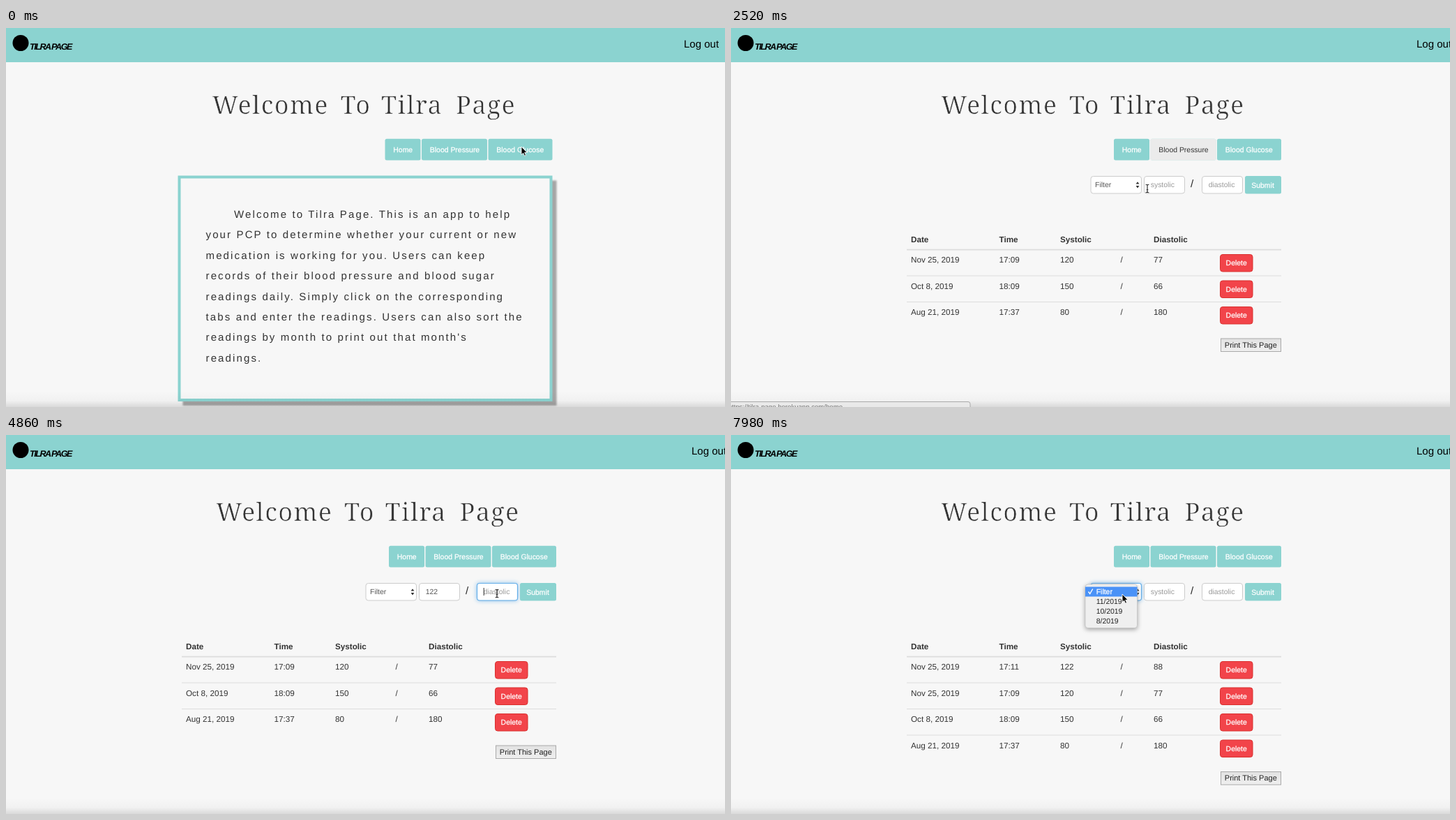
Animation, 1031 px wide and 543 px high, one loop 8000 ms. Source, as an HTML page:

```html
<!DOCTYPE html>
<html lang="en">
<head>
<meta charset="utf-8">
<title>Tilra Page</title>
<style>
  html, body { margin: 0; width: 100%; height: 100%; overflow: hidden; background: #f7f7f7; }
  svg { display: block; width: 1031px; height: 543px; }
  text { font-family: "Liberation Sans", Arial, sans-serif; text-rendering: geometricPrecision; white-space: pre; }
  text[fill="#fff"] { stroke: #fff; stroke-width: .25px; }
  /* a page-coloured outline thins the strokes */
  .title { font: 300 36px "Noto Serif", serif; letter-spacing: 1.4px; stroke: #f7f7f7; stroke-width: .75px; }
  .glow { filter: drop-shadow(0 0 3px rgba(102, 175, 233, .75)); }
  .menu { filter: drop-shadow(0 2px 3px rgba(0, 0, 0, .35)); }
</style>
</head>
<body>
<svg id="stage" viewBox="0 0 1031 543"></svg>
<script>
const TEAL = '#8bd3d0', INK = '#333', LOOP = 8000, STEP = 60;
const SMALL = 10.45, CELL = 11.7;

const text = (x, y, s, size = SMALL, fill = INK, extra = '') =>
  `<text x="${x}" y="${y}" font-size="${size}" fill="${fill}" ${extra}>${s}</text>`;
const box = (x, y, w, h, fill, r = 0, extra = '') =>
  `<rect x="${x}" y="${y}" width="${w}" height="${h}" rx="${r}" fill="${fill}" ${extra}/>`;
const group = (id, body, extra = '') => `<g id="${id}" ${extra}>${body}</g>`;
const rule = (y, h, fill) => box(252, y, 537, h, fill);

// Button with a second look that fades in over the first
const button = (id, x, y, w, h, label, tx, ty, fill, ink, edge) =>
  box(x, y, w, h, TEAL, 2.5) + text(tx, ty, label, SMALL, '#fff') +
  group(id, box(x, y, w, h, '#f7f7f7', 2.5) +
    box(x + .5, y + .5, w - 1, h - 1, fill, 2.5, `stroke="${edge}"`) + text(tx, ty, label, SMALL, ink));

const nav = (id, x, w, label, tx) =>
  button(id, x, 158.8, w, 30.6, label, tx, 177.8, '#ebebeb', INK, '#ebebeb');

const field = (x, w, y = 212) => box(x + .5, y + .5, w - 1, 24.5, '#fff', 3.5, 'stroke="#ccc"');
const focusRing = (id, x, w) =>
  group(id, box(x + .5, 212.5, w - 1, 24.5, '#fff', 3.5, 'stroke="#66afe9" stroke-width="1.2"'), 'class="glow"');
const arrows = x =>
  `<path d="M${x - 2.4} 223.6l2.4-3.4 2.4 3.4zM${x - 2.4} 226l2.4 3.4 2.4-3.4z" fill="#333"/>`;

const print = y => box(702.5, y + .5, 86, 18.5, 'url(#key)', 0, 'stroke="#a9a9a9"') +
  text(707.8, y + 13.3, 'Print This Page', 11, '#222');
const heads = list => list.map(([x, s]) => text(x, 307, s, CELL, INK, 'font-weight="700"')).join('') +
  rule(316.7, 1.8, '#ddd');

const columns = [258, 384.5, 472, 558.5, 606];
function table(id, rows) {
  let out = '';
  rows.forEach((row, i) => {
    const y = 37.5 * i;
    if (i) out += rule(317 + y, 1, '#ddd');
    row.forEach((s, c) => out += text(columns[c], 336.3 + y, s, CELL));
    out += box(701.5, 324.5 + y, 46.5, 24.5, '#f2444a', 3.5, 'stroke="#d9302f"') +
      text(709.6, 340.4 + y, 'Delete', SMALL, '#fff');
  });
  return group(id, out + print(332 + 37.5 * rows.length));
}

const readings = [
  ['Nov 25, 2019', '17:11', '122', '/', '88'],
  ['Nov 25, 2019', '17:09', '120', '/', '77'],
  ['Oct 8, 2019', '18:09', '150', '/', '66'],
  ['Aug 21, 2019', '17:37', '80', '/', '180']
];

const intro = [
  'Welcome to Tilra Page. This is an app to help',
  'your PCP to determine whether your current or new',
  'medication is working for you. Users can keep',
  'records of their blood pressure and blood sugar',
  'readings daily. Simply click on the corresponding',
  'tabs and enter the readings. Users can also sort the',
  "readings by month to print out that month's",
  'readings.'
];

const defs = `<defs>
  <linearGradient id="key" x2="0" y2="1"><stop stop-color="#e2e2e2"/><stop offset="1" stop-color="#efefef"/></linearGradient>
  <linearGradient id="foot" x2="0" y2="1"><stop stop-opacity="0"/><stop offset=".6" stop-opacity=".025"/><stop offset="1" stop-opacity=".12"/></linearGradient>
  <filter id="soft"><feGaussianBlur stdDeviation="1.3"/></filter></defs>`;

const header = box(0, 0, 1031, 49, TEAL) + '<circle cx="21" cy="21.5" r="11.5"/>' +
  text(34, 31.3, 'TILRA PAGE', 12.6, '#000', 'font-weight="700" font-style="italic" letter-spacing="-1.5"') +
  group('logout', text(983, 28, 'Log out', 15, '#000'));

const shell = group('shell',
  [[301, 'Welcome'], [485, 'To'], [543.5, 'Tilra'], [650.5, 'Page']]
    .map(([x, s]) => `<text class="title" x="${x}" y="123" fill="#333">${s}</text>`).join('') +
  nav('navHome', 549, 51, 'Home', 560.8) +
  nav('navBP', 601.5, 94, 'Blood Pressure', 613.3) +
  nav('navBG', 697, 92, 'Blood Glucose', 708.8));

const home = group('home',
  box(253.5, 218.5, 536, 322.5, '#a6a6a6', 0, 'filter="url(#soft)"') +
  box(248.5, 213.5, 533, 319.5, '#f7f7f7', 0, `stroke="${TEAL}" stroke-width="4"`) +
  intro.map((s, i) => text(i ? 286.5 : 327, 272 + 29.4 * i, s, 15, INK, 'letter-spacing="2.13"')).join(''));

const glucose = group('glucose',
  field(599, 73.5) + arrows(666) + group('bgFilter', text(605, 228, 'Filter', SMALL, '#555')) +
  field(675, 59) + text(684.8, 228, 'mg/dL', SMALL, '#999') +
  heads([[258, 'Date'], [388, 'Time'], [575.5, 'mg/dL']]) + print(333));

const pressure = group('pressure',
  field(515.5, 73.5) + focusRing('ringSel', 515.5, 73.5) + arrows(583) + text(522, 228, 'Filter', SMALL, '#555') +
  field(592, 59) + focusRing('ringSys', 592, 59) + text(601.7, 228, '', SMALL, '#555', 'id="sys"') +
  text(659, 228, '/', 15, '#222') +
  field(675, 59) + focusRing('ringDia', 675, 59) + text(684.7, 228, '', SMALL, '#555', 'id="dia"') +
  box(0, 219, 1, 11, '#333', 0, 'id="caret"') +
  heads([[258, 'Date'], [384.5, 'Time'], [472, 'Systolic'], [606, 'Diastolic']]) +
  table('rows3', readings.slice(1)) + table('rows4', readings));

const submit = group('submitBox',
  button('submitHot', 737, 212, 52, 25.5, 'Submit', 746.3, 228.5, '#fff', TEAL, TEAL));

const menu = group('menu',
  box(508, 214, 74.5, 62.5, '#efefef', 4, 'class="menu" stroke="#bbb" stroke-width=".6"') +
  box(508, 217.5, 74.5, 14, '#4a92f7') +
  '<path d="M512.5 224.5l2.2 3 4-7" fill="none" stroke="#fff" stroke-width="1.4"/>' +
  ['Filter', '11/2019', '10/2019', '8/2019']
    .map((s, i) => text(523.7, 228 + 14 * i, s, SMALL, i ? '#222' : '#fff')).join(''));

const status = group('status',
  box(-5, 535.5, 170, 20, '#e9e9e9', 3, 'id="bar" stroke="#aaa"') +
  text(160, 546, 'https://tilra-page.herokuapp.com/home', 9.6, '#777', 'text-anchor="end"'));

const cursors =
  group('arrow', '<path d="M0 0V11.6L2.7 9.2L4.5 13.2L6.5 12.3L4.7 8.4H8.2Z" fill="#000" stroke="#fff" stroke-width=".9"/>') +
  group('hand', '<path d="M-1.2 1Q0-.8 1.2 1V4.6Q2.4 3.8 3.3 5Q4.6 4.3 5.3 5.6Q6.9 5.2 7 7V9Q6.8 11 5.8 13H-.4Q-1.4 10.8-3.6 8.2Q-3.8 6.4-1.2 8Z" fill="#fff" stroke="#111" stroke-width="1.1"/><path d="M1.6 8v3M3.3 8v3" stroke="#111" stroke-width=".8"/>') +
  group('beam', '<path d="M-2.4-5.8Q0-5.8 0-4.4Q0-5.8 2.4-5.8M0-4.6V4.6M-2.4 5.8Q0 5.8 0 4.4Q0 5.8 2.4 5.8M-1.3 1.8H1.3" fill="none" stroke="#222" stroke-width="1.1"/>');

const stage = document.getElementById('stage');
stage.innerHTML = defs + header + home + shell + glucose + pressure + submit + menu +
  box(0, 520, 1031, 23, 'url(#foot)') + status + cursors;

const el = {};
stage.querySelectorAll('[id]').forEach(n => el[n.id] = n);
const show = (id, on) => el[id].style.display = on ? '' : 'none';
const fade = (id, k) => el[id].style.opacity = k;
const ramp = (t, a, b) => Math.min(1, Math.max(0, (t - a) / (b - a)));
const pulse = (t, a, b, c, d) => ramp(t, a, b) - ramp(t, c, d);
const within = (t, a, b) => t >= a && t < b;
const ease = k => k * k * (3 - 2 * k);

// time, x, y of the hot spot
const path = [
  [0, 739, 170], [60, 739, 170], [300, 732.5, 172.5], [1080, 732.5, 172.5], [1380, 653, 168],
  [2040, 653, 168], [2460, 597, 230], [2580, 597, 230], [2820, 618, 228], [3120, 618, 228],
  [3480, 661, 228], [4140, 661, 228], [4560, 704, 227], [5520, 704, 227], [5760, 762.5, 228],
  [6720, 762.5, 228], [7200, 562, 229.5], [7920, 562, 229.5], [7980, 561, 228]
];
const shapes = [[0, 'arrow'], [120, 'hand'], [2160, 'arrow'], [2400, 'beam'], [5700, 'hand'],
  [6840, 'beam'], [7080, 'arrow']];
const sysText = [[0, 'systolic'], [3420, '1'], [3660, '12'], [3900, '122'], [6060, 'systolic']];
const diaText = [[0, 'diastolic'], [4980, '8'], [5220, '88'], [6060, 'diastolic']];

const latest = (list, t) => list.filter(s => s[0] <= t).pop()[1];

function position(t) {
  const i = path.findIndex(p => p[0] > t);
  if (i < 0) return path[path.length - 1].slice(1);
  const [a, b] = [path[i - 1], path[i]], k = ease(ramp(t, a[0], b[0]));
  return [a[1] + (b[1] - a[1]) * k, a[2] + (b[2] - a[2]) * k];
}

function fill(id, value) {
  el[id].textContent = value;
  el[id].setAttribute('fill', /\d/.test(value) ? '#555' : '#999');
}

function draw(t) {
  const isHome = t < 360, isGlucose = within(t, 360, 1860), isPressure = t >= 1860;
  show('home', isHome);
  show('glucose', isGlucose);
  show('pressure', isPressure);
  show('submitBox', !isHome);
  el.shell.setAttribute('transform', `translate(${isHome ? -5.5 : 0} 0)`);
  el.logout.setAttribute('transform', `translate(${isHome ? -11 : 0} 0)`);

  fade('navHome', 0);
  fade('navBG', pulse(t, 60, 300, 1620, 1800));
  fade('navBP', pulse(t, 1140, 1320, 2880, 3060));
  fade('submitHot', pulse(t, 5640, 5820, 6840, 6960));
  show('bgFilter', t >= 840);

  show('status', within(t, 180, 3060));
  fade('status', 1 - ramp(t, 2880, 3060));
  el.bar.setAttribute('width', 170 + 178 * ramp(t, 1860, 2040));

  const sys = latest(sysText, t), dia = latest(diaText, t);
  fill('sys', sys);
  fill('dia', dia);
  show('ringSys', within(t, 2880, 4740));
  show('ringDia', within(t, 4740, 6060));
  show('ringSel', t >= 7560);
  const inSys = within(t, 2880, 4080), inDia = within(t, 4740, 5400);
  show('caret', inSys || inDia);
  const typed = (inDia ? dia : sys).replace(/\D/g, '').length;
  el.caret.setAttribute('x', (inDia ? 684.7 : 601.7) + typed * SMALL * .556);

  show('rows3', t < 6060);
  show('rows4', t >= 6060);
  show('menu', t >= 7560);

  const [x, y] = position(t), shape = latest(shapes, t);
  for (const id of ['arrow', 'hand', 'beam']) show(id, id === shape);
  el[shape].setAttribute('transform', `translate(${x} ${y})`);
}

const start = performance.now();
function tick() {
  const t = (performance.now() - start) % LOOP;
  draw(Math.floor(t / STEP) * STEP);
  requestAnimationFrame(tick);
}
tick();
</script>
</body>
</html>
```
